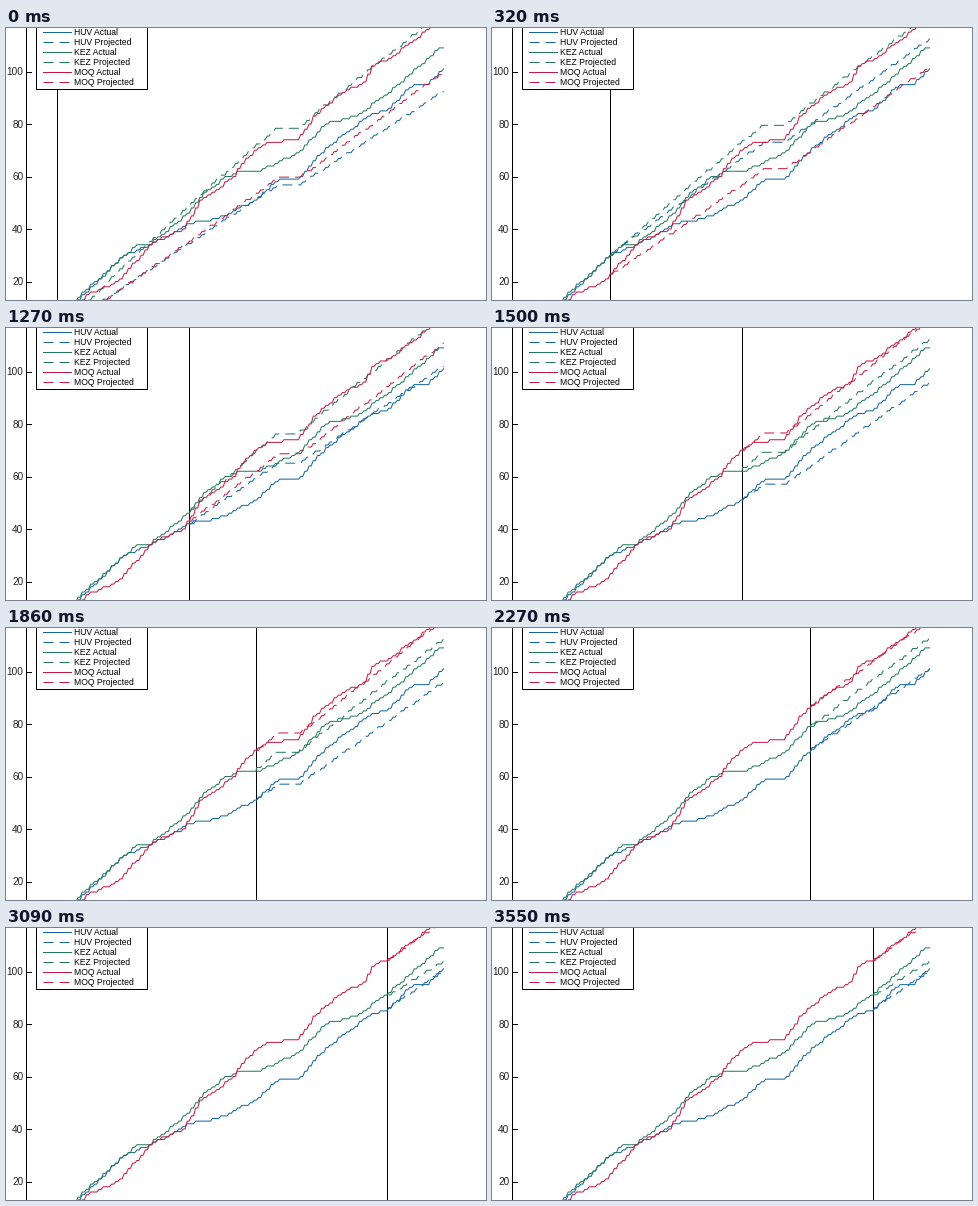
A matplotlib script that plays this animation: 480 by 272 pixels, repeating every 3.6 s.

```python
import numpy as np
import matplotlib.pyplot as plt
from matplotlib.animation import FuncAnimation
from matplotlib.patches import Rectangle

W, H, DPI = 480, 272, 100
FRAMES, INTERVAL = 80, 45
HOLD, LEAD = 15, 12          # frames per date, frames already spent on the first one
PX = 72 / DPI                # one pixel in points
DASH = (0, (10, 6))

GAMES = 82
START, END = 51, 438
BREAK = (272, 293)           # mid-season pause
DATES = [START, 118, 183, 250, 318, 381]
DAYS = np.linspace(START, END - 0.5, 185)

# path: key points (x, points); ends: projected total for each date;
# rush: how far ahead of an even schedule the team plays
TEAMS = [
    dict(name="HUV", color="#14659f", rush=0.005,
         path=[(51, 0), (72, 13), (119, 30), (146, 34), (182, 42), (212, 44),
               (250, 51), (273, 59), (293, 59), (318, 70), (366, 84),
               (381, 85), (407, 95), (422, 95), (437, 101)],
         ends=[92.5, 112.5, 102, 96, 101, 100.5]),
    dict(name="KEZ", color="#21795a", rush=0.035,
         path=[(51, 0), (72, 14), (131, 34), (143, 34), (183, 46), (200, 54),
               (221, 60), (234, 62), (253, 62), (293, 69), (320, 80),
               (350, 83), (380, 91), (434, 109)],
         ends=[123, 122, 121.5, 112.5, 113, 104]),
    dict(name="MOQ", color="#c71843", rush=-0.01,
         path=[(51, 0), (82, 15), (112, 20), (147, 35), (178, 40), (196, 51.5),
               (226, 59), (241, 67), (260, 73), (292, 74), (311, 84),
               (334, 91), (358, 96), (368, 103), (380, 104), (437, 120)],
         ends=[100, 102, 111, 120, 119.5, 119.5]),
]


def to_y(points):
    return 306 - 2.625 * np.asarray(points)


def actual(team):
    """Whole points, changing on every second day."""
    i = np.arange(len(DAYS)) // 2 * 2
    return np.round(np.interp(DAYS[i] + 1, *zip(*team["path"])))


def played(team, x):
    """Share of the season's games played at x, in whole games."""
    pause = BREAK[1] - BREAK[0]
    share = (x - START - np.clip(x - BREAK[0], 0, pause)) / (END - START - pause)
    share = share + team["rush"] * np.sin(np.pi * share)
    return np.round(GAMES * share) / GAMES


def projection(team, step):
    x0 = DATES[step]
    x = np.append(x0, DAYS[DAYS > x0])
    start = np.interp(x0, DAYS, team["actual"])
    done = played(team, x0)
    gain = (played(team, x) - done) / (1 - done)
    return x, to_y(start + (team["ends"][step] - start) * gain)


fig = plt.figure(figsize=(W / DPI, H / DPI), dpi=DPI, facecolor="white")
ax = fig.add_axes([0, 0, 1, 1])
ax.set(xlim=(0, W), ylim=(H, 0))
ax.axis("off")


def line(x, y, color="black", **kw):
    return ax.plot(x, y, color=color, lw=PX, **kw)[0]


def label(x, y, text, px, **kw):
    ax.text(x, y, text, fontsize=px * PX, family="Liberation Sans", **kw)


# left axis
line([20.2, 20.2], [-5, H + 5])
for value in range(20, 101, 20):
    y = to_y(value)
    line([20.2, 25], [y, y])
    label(17.3, y + 3.6, str(value), 10, ha="right", color="#222222")

# curves
marker = line([0, 0], [-5, H + 5], zorder=2)
for team in TEAMS:
    team["actual"] = actual(team)
    line(DAYS, to_y(team["actual"]), team["color"], zorder=3)
    team["dashes"] = line([], [], team["color"], ls=DASH,
                          dash_capstyle="butt", zorder=3)

# legend
ax.add_patch(Rectangle((30.2, -20), 111, 81.3, fc="white", ec="black",
                       lw=PX, zorder=5))
rows = [(t, kind) for t in TEAMS for kind in ("Actual", "Projected")]
for i, (team, kind) in enumerate(rows):
    y = 4.3 + 9.9 * i
    style = "-" if kind == "Actual" else DASH
    line([37, 65], [y, y], team["color"], ls=style, dash_capstyle="butt", zorder=6)
    label(68, y + 2.9, f"{team['name']} {kind}", 8.7, color="black", zorder=6)


def update(frame):
    step = min((frame + LEAD) // HOLD, len(DATES) - 1)
    marker.set_xdata([DATES[step] + 0.2] * 2)
    for team in TEAMS:
        team["dashes"].set_data(*projection(team, step))
    return [marker] + [team["dashes"] for team in TEAMS]


anim = FuncAnimation(fig, update, frames=FRAMES, interval=INTERVAL,
                     repeat=True, repeat_delay=0, blit=False)
plt.show()
```
